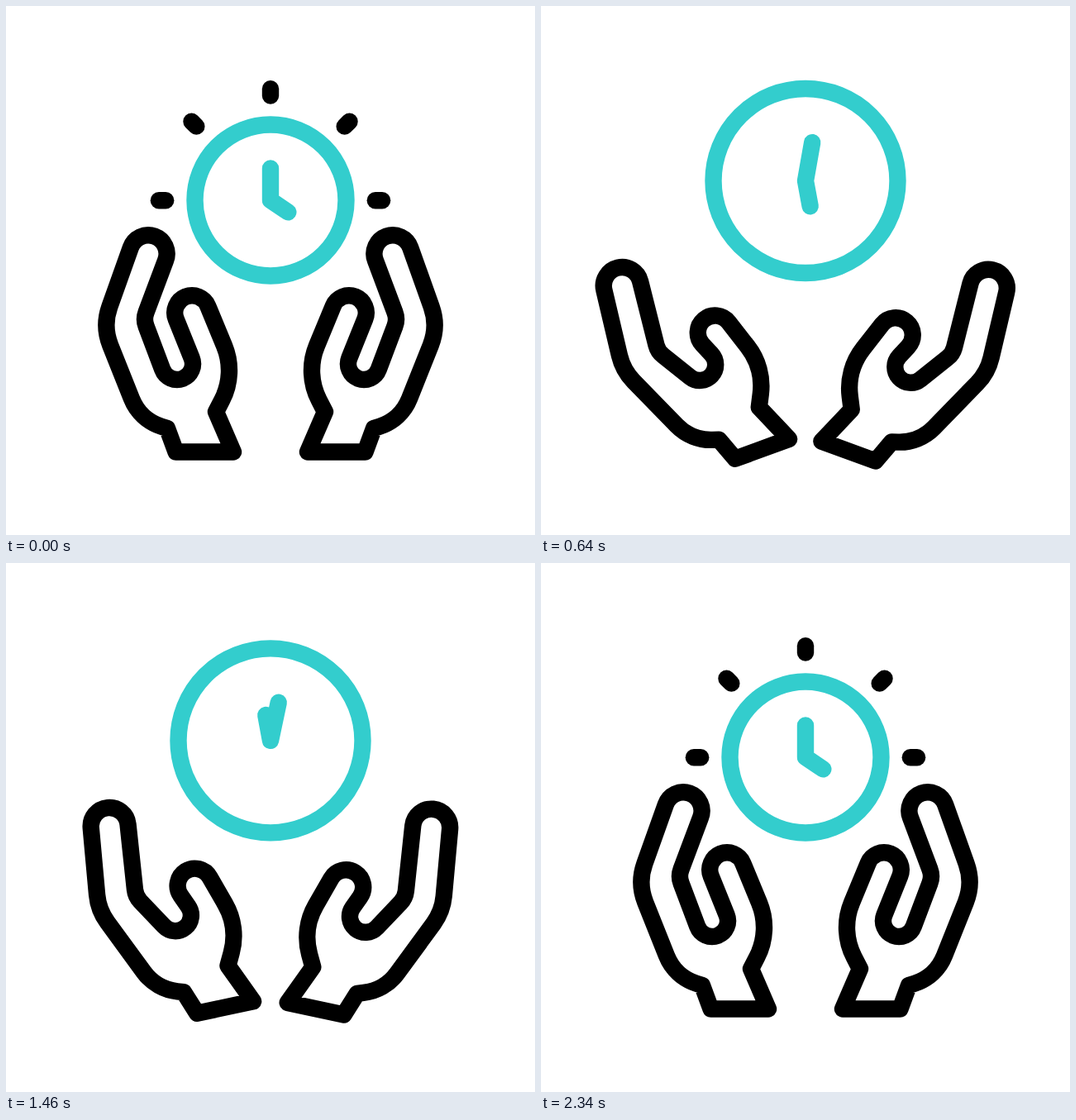
These frames come from a looping animation (640x640 px, 2400 ms). An HTML page:

```html
<!DOCTYPE html>
<html lang="en">
<head>
<meta charset="utf-8">
<title>Hands and clock</title>
<style>
html, body { margin: 0; width: 100%; height: 100%; overflow: hidden; background: #fff; }
svg { display: block; width: 100vw; height: 100vh; }
svg * { fill: none; stroke-width: 20.4; stroke-linecap: round; stroke-linejoin: round; }
.ink { stroke: #000; }
.teal { stroke: #33cdcd; }
</style>
</head>
<body>
<svg viewBox="0 0 640 640">
  <g id="rays"></g>
  <circle id="face" class="teal" cx="320"/>
  <path id="pointers" class="teal"/>
  <path id="left" class="ink"/>
  <path id="right" class="ink"/>
</svg>
<script>
const LOOP = 2400, STEP = 20, RAD = Math.PI / 180;
const $ = id => document.getElementById(id);
const unit = (t, a, b) => Math.min(1, Math.max(0, (t - a) / (b - a)));
const smooth = (t, a, b) => {
  const x = unit(t, a, b);
  return x * x * (3 - 2 * x);
};

// Eased track through [time, value] keys.
const track = (t, keys) => keys.reduce((v, [time, value], i) =>
  i ? v + (value - keys[i - 1][1]) * smooth(t, keys[i - 1][0], time) : value, 0);

// Speeds up until a, runs evenly, slows down from 1 - b.
function ramp(x, a, b) {
  const v = 1 / (1 - (a + b) / 2);
  if (x < a) return v * x * x / (2 * a);
  if (x > 1 - b) return 1 - v * (1 - x) ** 2 / (2 * b);
  return v * (x - a / 2);
}

// A hand is a belt around circles. A negative radius turns the other way;
// dx and dy move a circle when the hand spreads.
const node = (x, y, r = 0, dx = 0, dy = 0) => ({ x, y, r, dx, dy });
const HAND = [
  node(172, 300, 22.5, -23, -4),  // fingertip
  node(192, 379, -24, -5, 1),     // inner knuckle
  node(207, 433, -19, -2.5, -15), // gap
  node(225, 371, 20.8, 10, 17),   // thumb tip
  node(192, 441, 78),             // thumb base
  node(254, 491),                 // wrist
  node(275, 539.5),
  node(205.5, 539.5),
  node(195, 511),
  node(205.8, 453.5, 58),         // palm
  node(187.5, 386, 66, -5, -4)    // outer knuckle
];

function belt(nodes) {
  const n = nodes.length, full = 2 * Math.PI;
  const dir = nodes.map((p, i) => {
    const q = nodes[(i + 1) % n], dx = q.x - p.x, dy = q.y - p.y;
    const s = (q.r - p.r) / Math.hypot(dx, dy);
    return Math.atan2(dy, dx) - Math.asin(Math.max(-1, Math.min(1, s)));
  });
  const touch = (p, a) =>
    `${(p.x + p.r * Math.sin(a)).toFixed(2)} ${(p.y - p.r * Math.cos(a)).toFixed(2)}`;
  return nodes.map((p, i) => {
    const a = dir[(i + n - 1) % n], b = dir[i], r = Math.abs(p.r);
    const start = (i ? 'L' : 'M') + touch(p, a);
    if (!r) return start;
    const turn = (((b - a) * Math.sign(p.r)) % full + full) % full;
    if (turn > 1.5 * Math.PI) return start + 'L' + touch(p, b);
    return `${start}A${r} ${r} 0 ${+(turn > Math.PI)} ${+(p.r > 0)} ${touch(p, b)}`;
  }).join('') + 'Z';
}

const TILT = [[80, 0], [740, 21.4], [1310, 9.2], [1790, 21.4], [2340, 0]];
const SPREAD = [[80, 0], [640, 1], [1680, 1], [2240, 0]];

// Spreads the hand, tilts it around the wrist and mirrors it if asked.
function drawHand(id, t, pivotX, mirror) {
  const tilt = track(t, TILT) * RAD, spread = track(t, SPREAD);
  const c = Math.cos(tilt), s = Math.sin(tilt), pivotY = 520;
  $(id).setAttribute('d', belt(HAND.map(p => {
    const x = p.x + p.dx * spread - pivotX, y = p.y + p.dy * spread - pivotY;
    return { x: pivotX + 21 * spread + x * c + y * s, y: pivotY - x * s + y * c, r: p.r };
  })));
  if (mirror) $(id).setAttribute('transform', 'matrix(-1 0 0 1 640 0)');
}

const HEIGHT = [[160, 235], [640, 211.5], [1000, 259.5], [1400, 211.5], [1760, 257], [2240, 235]];
const SIZE = [[160, 91.5], [640, 111.5], [1760, 111.5], [2240, 91.5]];
const ROCK = [[160, 0], [640, 10], [1160, -12], [1470, 12], [1900, -14], [2240, 0]];

function drawClock(t) {
  const y = track(t, HEIGHT), r = track(t, SIZE), rock = track(t, ROCK);
  const hour = 124 + rock + 360 * ramp(unit(t, 160, 2240), 0.36, 0.14);
  const tip = (deg, len) =>
    `${320 + Math.sin(deg * RAD) * len * r} ${y - Math.cos(deg * RAD) * len * r}`;
  $('face').setAttribute('cy', y);
  $('face').setAttribute('r', r);
  $('pointers').setAttribute('d', `M${tip(rock, 0.422)}L320 ${y}L${tip(hour, 0.281)}`);
}

const rays = [-90, -45, 0, 45, 90].map(a => {
  const line = document.createElementNS('http://www.w3.org/2000/svg', 'line');
  line.setAttribute('class', 'ink');
  line.setAttribute('transform', `translate(320 235.3) rotate(${a})`);
  line.setAttribute('y1', -126.8);
  $('rays').append(line);
  return line;
});

function drawRays(t) {
  const len = 8.3 * (1 - smooth(t, 160, 400) + smooth(t, 2000, 2240));
  $('rays').setAttribute('visibility', len > 0.01 ? 'visible' : 'hidden');
  rays.forEach(l => l.setAttribute('y2', -126.8 - len));
}

function draw(t) {
  drawRays(t);
  drawClock(t);
  drawHand('left', t, 233, false);
  drawHand('right', t, 241, true);
}

let begin;
function tick(now) {
  if (begin === undefined) begin = now;
  const t = (now - begin) % LOOP;
  draw(t - t % STEP);
  requestAnimationFrame(tick);
}
draw(0);
requestAnimationFrame(tick);
</script>
</body>
</html>
```
